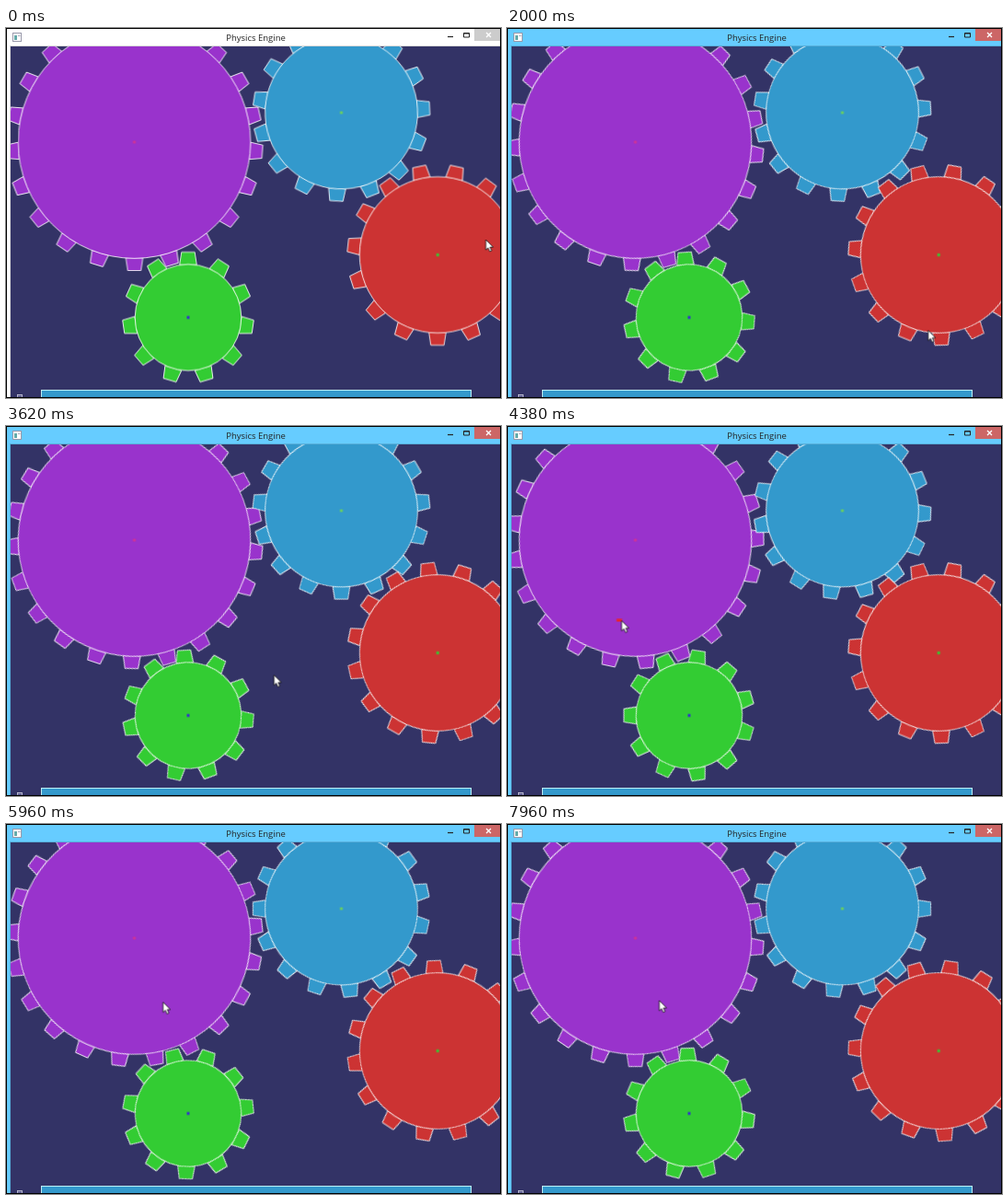
An HTML page for the animation above (8 s loop, 538 px wide and 402 px high).

```html
<!DOCTYPE html>
<html lang="en">
<head>
<meta charset="utf-8">
<title>Physics Engine</title>
<style>
  html, body { margin: 0; width: 100%; height: 100%; overflow: hidden; background: #000; }
  svg { display: block; width: 100vw; height: 100vh; }
  text { font: 9.5px "Open Sans", "Noto Sans", sans-serif; fill: #222; }

  .spin { animation: spin 8s ease-in-out infinite; stroke: #fff; stroke-width: .8; stroke-linejoin: round; }
  @keyframes spin {
    0%, 1.25% { transform: rotate(var(--a0)); animation-timing-function: ease-in; }
    25% { transform: rotate(var(--a1)); animation-timing-function: ease-out; }
    35.875% { transform: rotate(var(--a2)); }
    54.75% { transform: rotate(var(--a3)); }
    65.75% { transform: rotate(var(--a4)); }
    82.75% { transform: rotate(var(--a5)); }
    99.5%, 100% { transform: rotate(var(--a6)); }
  }

  #cursor { animation: point 8s ease-in-out infinite; }
  @keyframes point {
    0%, 1.25% { transform: translate(521.5px, 230px); }
    25% { transform: translate(457.7px, 328.5px); }
    35.875% { transform: translate(455px, 328.5px); }
    54.75% { transform: translate(124.5px, 211.5px); }
    65.75% { transform: translate(173px, 187.3px); }
    82.75% { transform: translate(168.5px, 199px); }
    99.5%, 100% { transform: translate(165.5px, 191.7px); }
  }

  #grab { animation: grab 8s step-end infinite; }
  @keyframes grab {
    0%, 57% { visibility: hidden; }
    53% { visibility: visible; }
  }

  /* The window gains focus shortly after the start. */
  .frame { animation: frame 8s step-end infinite; }
  @keyframes frame { 0% { fill: #fff; } 6% { fill: #6cf; } }
  .close { animation: close 8s step-end infinite; }
  @keyframes close { 0% { fill: #ccc; } 6% { fill: #c66; } }
</style>
</head>
<body>
<svg viewBox="0 0 538 402" preserveAspectRatio="none">
  <defs>
    <clipPath id="client"><path d="M5 20H537V401H5Z"/></clipPath>
  </defs>
  <rect width="538" height="402"/>
  <rect class="frame" x="1" y="1" width="536" height="400"/>
  <path d="M4.5 401V19.5H537" fill="none" stroke="#000" stroke-opacity=".15"/>

  <g id="icon">
    <rect x="7.5" y="5.5" width="9" height="9" fill="#fff" stroke="#99a"/>
    <path d="M9 8H12V13H9Z" fill="#6aa"/>
    <path d="M13 8.5H15.5" stroke="#aab"/>
  </g>
  <text x="271.5" y="14" text-anchor="middle">Physics Engine</text>
  <path d="M480 9.5H486" stroke="#222" stroke-width="1.2"/>
  <path d="M497.5 5.5H503.5V10H497.5ZM497.5 6H503.5" fill="none" stroke="#222"/>
  <rect class="close" x="509" y="1" width="28" height="13"/>
  <path d="M522 5L527 10M527 5L522 10" stroke="#fff" stroke-width="1.3"/>

  <g clip-path="url(#client)">
    <rect x="5" y="20" width="532" height="381" fill="#336"/>
    <g id="gears"></g>
    <rect x="38.5" y="393.5" width="467" height="12" fill="#39c" stroke="#cff" stroke-width=".9"/>
    <rect x="12.5" y="398.5" width="5" height="5" fill="#669" stroke="#ccd" stroke-width=".8"/>
    <g id="cursor">
      <path id="grab" d="M-5.5 -.3H.5" stroke="#e22" stroke-width="2.6"/>
      <path d="M0 0V11.2L2.5 8.9 4.3 12.9 6.3 12 4.6 8.1H8Z" fill="#fff" stroke="#111" stroke-width=".8"/>
    </g>
  </g>
</svg>
<script>
  const gears = [
    { x: 139.5, y: 124, r: 126.3, teeth: 21, fill: '#93c', dot: '#c39',
      poses: [90, 108.8, 114.6, 102.1, 117, 111.8, 124.3] },
    { x: 198, y: 314.5, r: 57.8, teeth: 11, fill: '#3c3', dot: '#33c',
      poses: [-90, -126.7, -138.1, -114.5, -141.4, -133.1, -157] },
    { x: 364.5, y: 92, r: 82.9, teeth: 15, fill: '#39c', dot: '#6c6',
      poses: [-2.8, -27, -37.8, -22, -37.8, -34.4, -48] },
    { x: 469.2, y: 246.5, r: 84.9, teeth: 15, fill: '#c33', dot: '#3c3',
      poses: [90.2, 112.2, 126.8, 112.2, 123.5, 123.6, 134] }
  ];

  const gearMarkup = ({ x, y, r, teeth, fill, dot, poses }) => {
    const base = r - .5, tip = r + 13.2;
    const tooth = `M${base} -9.3L${tip} -7.2V7.2L${base} 9.3Z`;
    const ring = Array.from({ length: teeth }, (_, i) =>
      `<path d="${tooth}" transform="rotate(${i * 360 / teeth})"/>`).join('');
    const vars = poses.map((a, i) => `--a${i}:${a}deg`).join(';');
    return `<g transform="translate(${x} ${y})">
      <g class="spin" fill="${fill}" style="${vars}">${ring}<circle r="${r}"/></g>
      <rect x="-1.5" y="-1.5" width="3" height="3" fill="${dot}"/></g>`;
  };

  document.getElementById('gears').innerHTML = gears.map(gearMarkup).join('');
</script>
</body>
</html>
```
